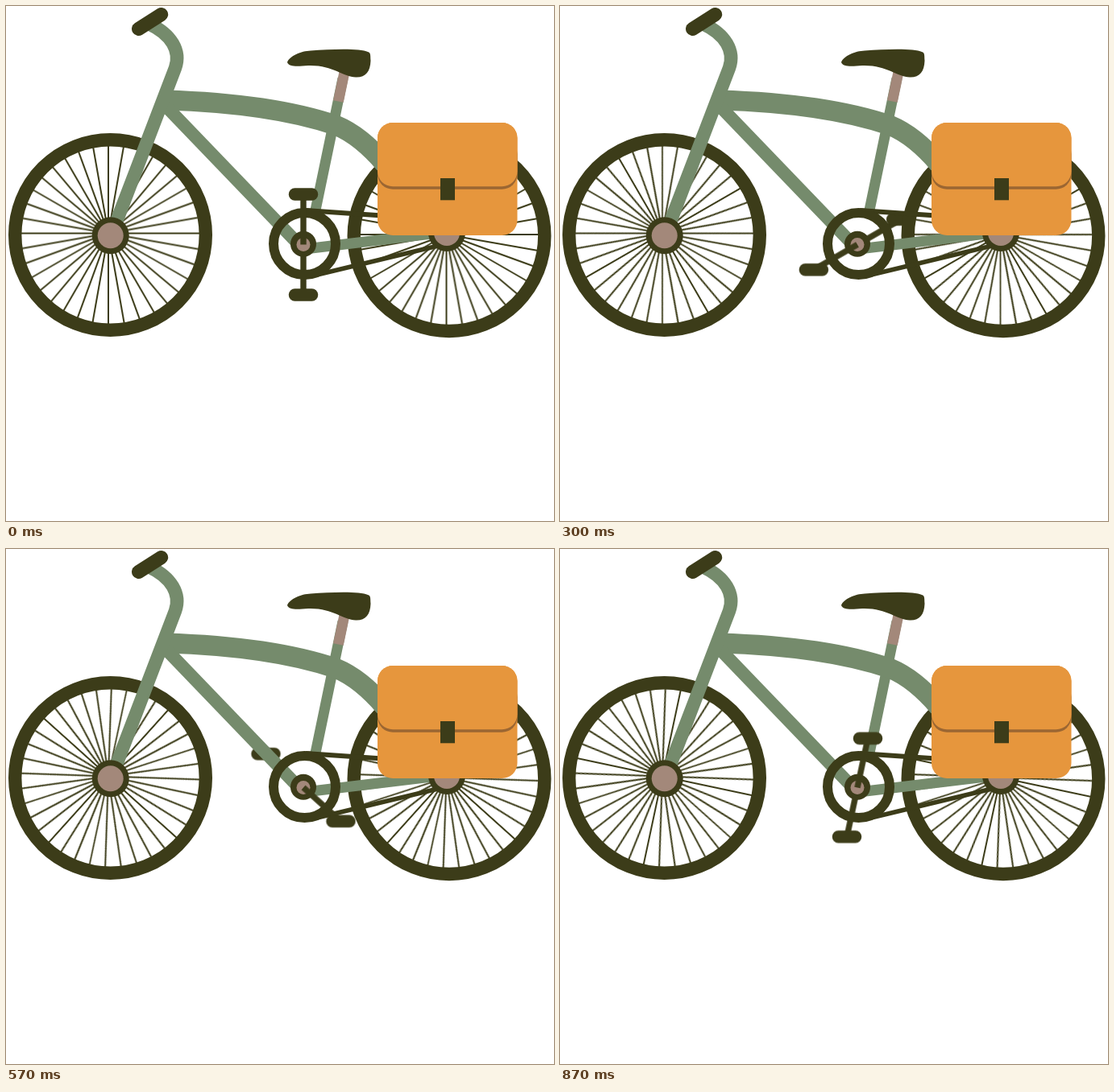
These frames come from a looping animation (680 px wide and 640 px high, 900 ms). An HTML page without scripts:

```html
<!DOCTYPE html>
<html lang="en">
<head>
<meta charset="utf-8">
<title>Bicycle</title>
<style>
  html, body { margin: 0; width: 100%; height: 100%; overflow: hidden; background: #fff; }
  svg { display: block; width: 680px; height: 640px; }

  .dark { fill: #3c3c19; }
  .pink { fill: #a3887a; }
  .orange { fill: #e6963d; }
  .line { fill: none; stroke: #3c3c19; }
  .frame { fill: none; stroke: #758b6c; }
  .post { fill: none; stroke: #a3887a; }

  /* the small negative delay keeps each step clear of its boundary */
  .spin, .level { animation: turn .9s steps(30) -.003s infinite; }
  .level { animation-direction: normal; animation-name: unturn; }
  @keyframes turn { to { transform: rotate(-360deg); } }
  @keyframes unturn { to { transform: rotate(360deg); } }
</style>
</head>
<body>
<svg viewBox="0 0 680 640" xmlns="http://www.w3.org/2000/svg">
  <defs>
    <path id="spoke" class="line" stroke-width="2" d="M0 -117V117"/>
    <g id="trio">
      <use href="#spoke"/>
      <use href="#spoke" transform="rotate(10)"/>
      <use href="#spoke" transform="rotate(20)"/>
    </g>
    <g id="half">
      <use href="#trio"/>
      <use href="#trio" transform="rotate(30)"/>
      <use href="#trio" transform="rotate(60)"/>
    </g>
    <g id="spokes">
      <use href="#half"/>
      <use href="#half" transform="rotate(90)"/>
    </g>
    <circle id="tyre" class="line" r="118.3" stroke-width="16.4"/>
    <g id="hub">
      <circle class="dark" r="23"/>
      <circle class="pink" r="16"/>
    </g>
    <path id="arm" class="line" stroke-width="7.4" d="M0 0V-62.5"/>
    <rect id="pedal" class="dark" x="-18.2" y="-7.8" width="36.4" height="15.6" rx="7.6"/>
  </defs>

  <!-- far crank -->
  <g transform="translate(369 296.5) rotate(180)">
    <g class="spin">
      <use href="#arm"/>
      <g transform="translate(0 -62.5)"><g class="level"><use href="#pedal"/></g></g>
    </g>
  </g>

  <!-- wheels -->
  <g transform="translate(127 282.5)"><g class="spin"><use href="#spokes"/></g></g>
  <g transform="translate(546.5 284)"><g class="spin"><use href="#spokes"/></g></g>
  <use href="#tyre" x="129.5" y="284.5"/>
  <use href="#tyre" x="550" y="285.7"/>

  <!-- frame -->
  <path class="frame" stroke-width="13" d="M418 90L383.5 256M375 301.5L545 281"/>
  <path class="post" stroke-width="13" d="M420 82L412.4 118.5"/>
  <path class="frame" stroke-width="25" d="M198 117Q330 121 410 148.500Q440 161 470 196"/>
  <path class="frame" stroke-width="16" d="M196 122L365 298"/>
  <path class="frame" stroke-width="16.500" d="M178 22.500C205 35 217.500 56 210 77L137 268"/>
  <path class="line" stroke-width="17" stroke-linecap="round" d="M164.500 28.500L192.700 10.500"/>
  <path class="dark" d="M349 70C352 62 366 56 378 55.500C405 53.500 440 52.500 449 57C453 58 452 62 452.500 68C452 82 446 89 434 88.500C418 88 405 73 375 74C362 75 351 76 349 70Z"/>

  <!-- drivetrain -->
  <use href="#hub" x="129.700" y="285.200"/>
  <use href="#hub" x="547" y="282"/>
  <path class="line" stroke-width="5.800" d="M372 254L547 266M384 334.500L538 297.500"/>
  <circle class="line" cx="370.500" cy="295.500" r="38.500" stroke-width="12"/>
  <circle class="dark" cx="369" cy="295.700" r="16"/>
  <circle class="pink" cx="369" cy="296.500" r="8.500"/>

  <!-- near crank -->
  <g transform="translate(369 296.500)">
    <g class="spin">
      <use href="#arm"/>
      <g transform="translate(0 -62.500)"><g class="level"><use href="#pedal"/></g></g>
    </g>
  </g>

  <!-- bag -->
  <rect class="orange" x="461" y="145" width="173.500" height="140" rx="19"/>
  <rect x="461" y="165" width="173.500" height="62.800" rx="19" fill="#9b6632"/>
  <rect class="orange" x="461" y="145" width="173.500" height="79.300" rx="19"/>
  <rect class="dark" x="539" y="214" width="18" height="27.300"/>
</svg>
</body>
</html>
```
